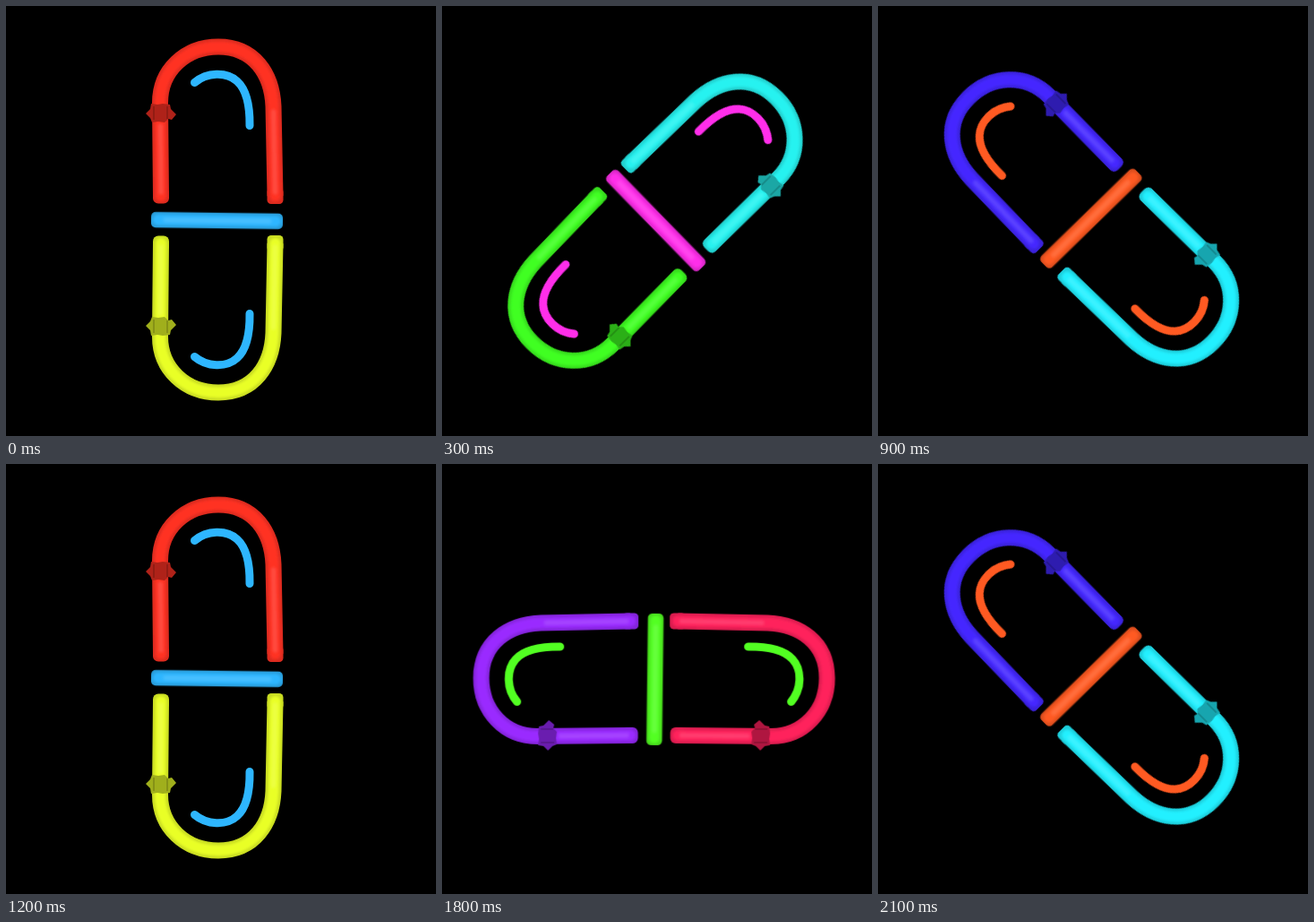
Animation, 480 px wide and 480 px high, one loop 2400 ms. Source, as an HTML page:

```html
<!DOCTYPE html>
<html lang="en">
<head>
<meta charset="utf-8">
<title>Neon capsule</title>
<style>
  html, body { margin: 0; width: 100%; height: 100%; overflow: hidden; background: #000; }
  svg { display: block; width: 100vw; height: 100vh; }

  .capsule {
    transform-origin: 237.1px 238.8px;
    animation: pose 1.2s step-end infinite;
  }
  /* Each pose jumps to its own angle and palette */
  @keyframes pose {
    0%   { transform: rotate(0deg);   --top: #ff3224; --bottom: #e9ff28; --bar: #2eb6ff; }
    25%  { transform: rotate(225deg); --top: #3fff22; --bottom: #27f2f0; --bar: #ff2eea; }
    50%  { transform: rotate(270deg); --top: #9a2aff; --bottom: #ff215c; --bar: #52ff22; }
    75%  { transform: rotate(135deg); --top: #22f0ff; --bottom: #4428ff; --bar: #ff5a22; }
    100% { transform: rotate(0deg);   --top: #ff3224; --bottom: #e9ff28; --bar: #2eb6ff; }
  }

  .top { color: var(--top); }
  .bottom { color: var(--bottom); }
  .bar { color: var(--bar); }

  .edge { fill: none; stroke: currentColor; stroke-width: 18; }
  .tip { fill: currentColor; }
  .core { fill: none; stroke: currentColor; stroke-width: 12; stroke-linecap: round; }
  .shine { fill: none; stroke: #fff; stroke-width: 5; stroke-linecap: round; opacity: .12; }
  .arc { fill: none; stroke: currentColor; stroke-width: 9; stroke-linecap: round; }
  .dim { filter: brightness(.86); }
  .knot { fill: currentColor; filter: brightness(.8); }
  .crease { fill: none; stroke: #000; stroke-width: 2; opacity: .16; }
</style>
</head>
<body>
<svg viewBox="0 0 480 480">
  <defs>
    <filter id="soft" filterUnits="userSpaceOnUse" x="0" y="0" width="480" height="480">
      <feGaussianBlur stdDeviation=".6"/>
    </filter>
    <filter id="blend" filterUnits="userSpaceOnUse" x="0" y="0" width="480" height="480">
      <feGaussianBlur stdDeviation="1.4"/>
    </filter>

    <path id="bend" d="M173 212 L172 108 C172 72 200 45.5 237 45.5 C277 45.5 297 76 298.5 112 L300.5 212"/>

    <g id="half">
      <g class="dim">
        <g filter="url(#soft)">
          <use href="#bend" class="edge"/>
          <rect class="tip" x="164" y="203" width="18" height="17.5" rx="6"/>
          <rect class="tip" x="291.5" y="203" width="18" height="18" rx="4.5"/>
        </g>
      </g>
      <g filter="url(#blend)">
        <use href="#bend" class="core"/>
        <path class="shine" d="M173 208 L172.3 134 M298.6 118 L300.4 208"/>
      </g>
      <g class="dim">
        <path class="knot" d="M156 120 L161 115 162 109 169 110 175 109 183 110 184 115 190 121 185 127 181 126 177 130 170 129 163 130 161 125Z"/>
      </g>
      <path class="crease" d="M165 112 V127 M180 112 V126"/>
    </g>

    <path id="glint" class="arc" filter="url(#soft)" d="M210.5 85.5 C224 74 246 73 258 84 C269 94 272.3 112 272 133.5"/>
  </defs>

  <rect width="480" height="480"/>
  <g class="capsule">
    <g class="top"><use href="#half"/></g>
    <g class="bottom"><use href="#half" transform="translate(0 477) scale(1 -1)"/></g>
    <g class="bar">
      <use href="#glint"/>
      <use href="#glint" transform="translate(0 477) scale(1 -1)"/>
      <g transform="rotate(.7 235.5 239.5)">
        <g class="dim">
          <rect class="tip" filter="url(#soft)" x="162" y="230.8" width="147" height="17.4" rx="5"/>
        </g>
        <g filter="url(#blend)">
          <path class="core" d="M170 239.5 H301"/>
          <path class="shine" d="M178 239.5 H294"/>
        </g>
      </g>
    </g>
  </g>
</svg>
</body>
</html>
```
